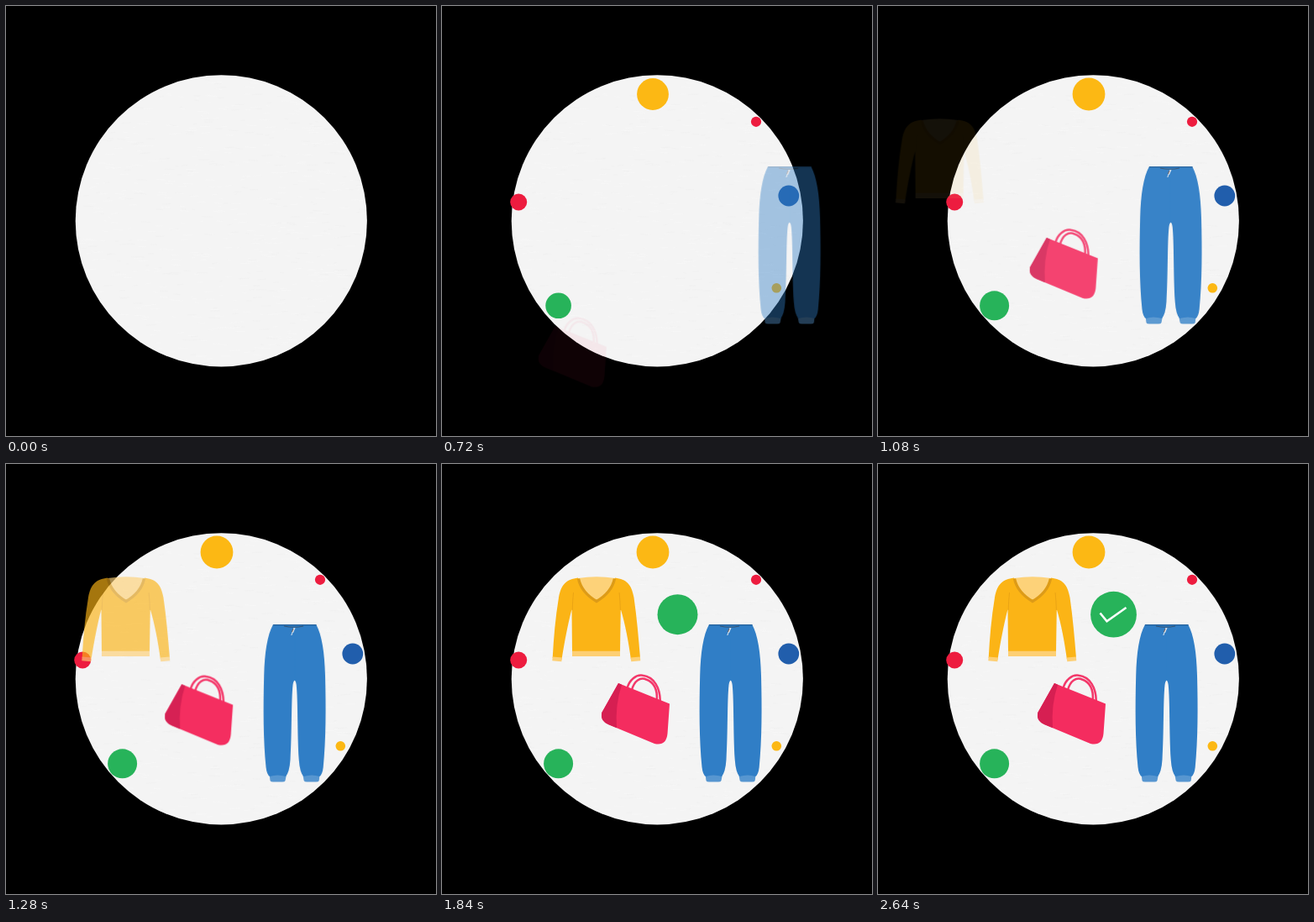
An HTML page with a canvas for the animation above (4000 ms loop, 512 by 512 pixels).

```html
<!DOCTYPE html>
<html lang="en">
<head>
<meta charset="utf-8">
<title>Wardrobe</title>
<style>
html, body { margin: 0; width: 100%; height: 100%; overflow: hidden; background: #000; }
canvas { display: block; width: 100%; height: 100%; }
</style>
</head>
<body>
<canvas id="stage" width="512" height="512"></canvas>
<script>
const SIZE = 512, LOOP = 4000, STEP = 40;
const ctx = document.getElementById('stage').getContext('2d');

const easeOut = u => 1 - (1 - u) ** 3;
const progress = (t, start, length) =>
  easeOut(Math.min(1, Math.max(0, (t - start) / length)));

function disc(c, x, y, r, color) {
  if (r <= 0) return;
  c.fillStyle = color;
  c.beginPath();
  c.arc(x, y, r, 0, Math.PI * 2);
  c.fill();
}

function fill(c, color, d) {
  c.fillStyle = color;
  c.fill(new Path2D(d));
}

function line(c, color, width, d) {
  c.strokeStyle = color;
  c.lineWidth = width;
  c.stroke(new Path2D(d));
}

// Each garment is flattened first so that it fades as one piece.
function sprite(draw) {
  const layer = document.createElement('canvas');
  layer.width = layer.height = SIZE;
  draw(layer.getContext('2d'));
  return layer;
}

// Draws a half shape and its reflection about the vertical line x.
function mirrored(c, x, draw) {
  draw(c);
  c.save();
  c.translate(2 * x, 0);
  c.scale(-1, 1);
  draw(c);
  c.restore();
}

const paper = sprite(c => {
  disc(c, 256.3, 255.8, 173.6, '#f4f4f4');
  c.globalCompositeOperation = 'source-atop';
  let seed = 7;
  const random = () => (seed = seed * 16807 % 2147483647) / 2147483647;
  for (let i = 0; i < 900; i++) {
    const x = 80 + random() * 350, y = 80 + random() * 350;
    const w = 3 + random() * 10;
    line(c, i % 3 ? '#f8f8f8' : '#f1f1f1', 0.7,
      `M${x} ${y}l${w} ${random() * 2 - 1}`);
  }
});

const pants = sprite(c => {
  mirrored(c, 343.6, c => {
    fill(c, '#5796d0', 'M313.5 369H334L332.5 377Q332 378.5 329 378.5H318Q315 378.5 314.5 377Z');
    fill(c, '#307ec6', `M344 191H318C311 204 308 224 307.2 252
      C306.2 290 306.2 328 309.5 361Q310.5 370 314 372Q323 369 333 372
      Q337.5 367 338.5 352C340.5 318 339.5 282 341.5 263Q342.3 257.5 344 257.5Z`);
  });
  line(c, '#245b91', 1, 'M318 191.8H369.5');
  line(c, '#315171', 1.2, 'M331 193Q343 195.5 354 193');
  line(c, '#e5eaf0', 1, 'M343 195L339.8 204M344 195L341.5 201');
  line(c, '#76513f', 0.8, 'M342 196L340.5 200');
});

const sweater = sprite(c => {
  fill(c, '#fdd279', 'M162 136Q184 132.5 206 136L203 151L184 164L166 151Z');
  fill(c, '#fbb416', `M162 135.5C148 137.5 142 143 139 159
    C135 183 133 207 131.7 231L142.5 233C146 211 150 190 154.5 173
    V174L155 224H212L212.8 173C218 190 222 211 225 233L236 231
    C234 207 232 183 228.5 159C225.5 143 220 137.5 206 135.5
    C204 149 195 160 184 162C173 160 164 149 162 135.5Z`);
  mirrored(c, 183.8, c => {
    fill(c, '#fdcf74', 'M131.7 229.5L143 230.5L142.3 235.3L131.3 234.3Z');
    line(c, '#e6a015', 0.8, 'M155.2 174Q155.5 163 156.5 153');
  });
  fill(c, '#fdcf74', 'M155 222.8H212V229H155Z');
  line(c, '#dd9b17', 3.4, 'M162.5 136.5Q166 153 184 163.5Q202 153 205.5 136.5');
});

const bag = sprite(c => {
  line(c, '#f3386a', 2.5, 'M220.5 267C223 257 231 250.5 239 251.8C253 253.5 259.5 267 259.8 282');
  line(c, '#f3386a', 2.5, 'M226 269C229 258 236 253.5 243 256.5C253 260 256.5 269 255.8 281');
  fill(c, '#f42c5f', `M210 261L271 285.5L268.5 321
    Q267 336 253 333L199 310.5Q188 306 190.3 296Z`);
  fill(c, '#d61f52', 'M210 261L214 262.7Q206 287 208 314.3L199 310.5Q188 306 190.3 296Z');
});

// x, y, radius, colour, start
const dots = [
  [91.2, 233.5, 10, '#ed1c3f', 20],
  [374, 137.8, 6.1, '#ed1c3f', 120],
  [412.8, 226, 12.4, '#215eac', 220],
  [398.3, 335.8, 5.8, '#fcb814', 320],
  [251, 105, 19.4, '#fcb814', 480],
  [138.6, 356.8, 17.5, '#27b35a', 550],
];

// sprite, start, offset x, offset y
const clothes = [
  [pants, 600, 120, 0],
  [bag, 705, -80, 128],
  [sweater, 1060, -120, 0],
];

const tick = [[264.5, 177.5], [272.5, 187.3], [295.5, 171]];

function drawTick(amount) {
  if (amount <= 0) return;
  const [a, b, e] = tick;
  const first = Math.hypot(b[0] - a[0], b[1] - a[1]);
  const second = Math.hypot(e[0] - b[0], e[1] - b[1]);
  const length = amount * (first + second);
  const mix = (p, q, k) => [p[0] + (q[0] - p[0]) * k, p[1] + (q[1] - p[1]) * k];
  ctx.beginPath();
  ctx.moveTo(...a);
  ctx.lineTo(...mix(a, b, Math.min(1, length / first)));
  if (length > first) ctx.lineTo(...mix(b, e, (length - first) / second));
  ctx.strokeStyle = '#fff';
  ctx.lineWidth = 2.6;
  ctx.stroke();
}

function draw(t) {
  ctx.fillStyle = '#000';
  ctx.fillRect(0, 0, SIZE, SIZE);
  ctx.drawImage(paper, 0, 0);

  for (const [x, y, r, color, start] of dots)
    disc(ctx, x, y, r * progress(t, start, 340), color);

  for (const [image, start, dx, dy] of clothes) {
    const p = progress(t, start, 732);
    ctx.globalAlpha = p;
    ctx.drawImage(image, dx * (1 - p), dy * (1 - p));
  }
  ctx.globalAlpha = 1;

  disc(ctx, 280.5, 179.2, 27.4 * progress(t, 1680, 320), '#27b35a');
  drawTick(progress(t, 2175, 320));
}

const origin = performance.now();
function frame() {
  const t = (performance.now() - origin) % LOOP;
  draw(Math.floor(t / STEP) * STEP);
  requestAnimationFrame(frame);
}
frame();
</script>
</body>
</html>
```
